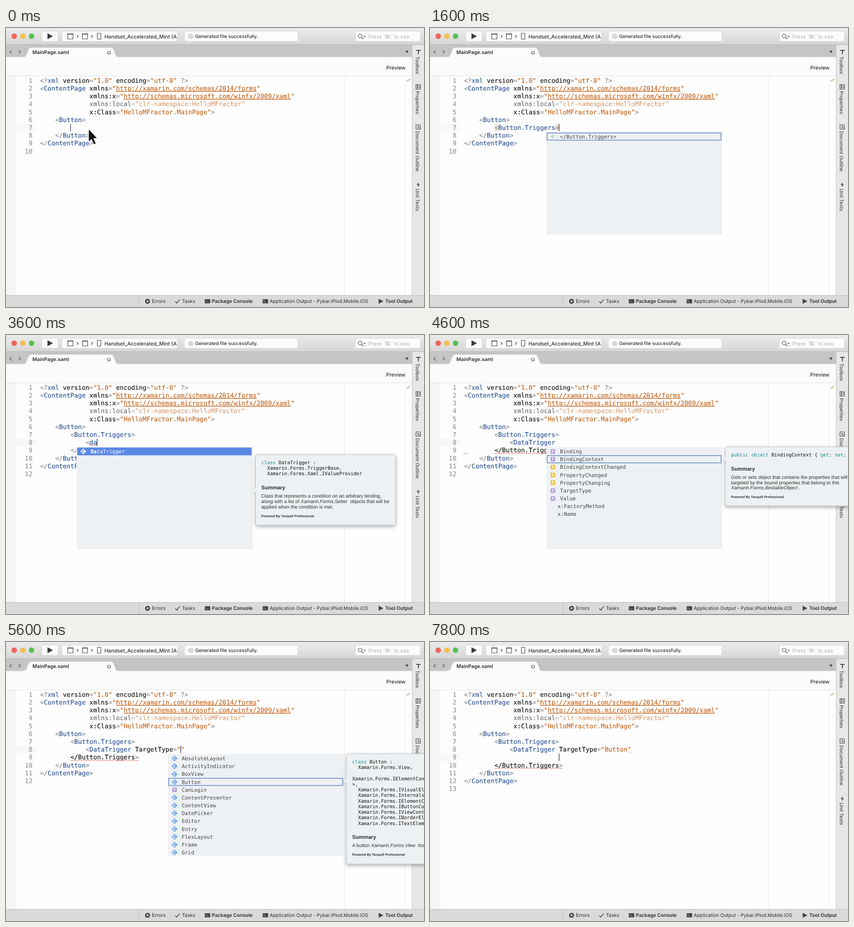
An HTML page that plays this animation: 917 by 611 pixels, repeating every 8000 ms.

```html
<!DOCTYPE html>
<html lang="en">
<head>
<meta charset="utf-8">
<title>XAML completion</title>
<style>
  html, body { margin: 0; width: 100%; height: 100%; overflow: hidden; background: #fefefe; }
  svg { display: block; width: 917px; height: 611px; }
  text { white-space: pre; text-rendering: geometricPrecision; }
  text, tspan { fill: currentColor; }
  .ui { font-family: Inter, sans-serif; color: #2c2c2c; }
  .b { font-weight: 600; }
  .mono { font-family: "DejaVu Sans Mono", monospace; color: #111; }
  .code, .code tspan { stroke: currentColor; stroke-width: .15px; }
  .doc { font-family: "Liberation Sans", Arial, sans-serif; color: #2c2c2c; }
  .p { color: #858585; }
  .tag { color: #2b5293; }
  .str { color: #c1621a; }
  .link { text-decoration: underline 1px; text-underline-offset: 2px; text-decoration-skip-ink: none; }
  .kw { color: #14888f; }
  .num { color: #858585; text-anchor: end; }
  .line { fill: none; stroke: #444; stroke-width: 1.2; }
  .field { fill: #fcfcfc; stroke: #d6d6d6; stroke-width: .6; }
</style>
</head>
<body>
<svg viewBox="0 0 917 611">
  <defs>
    <linearGradient id="bar" x2="0" y2="1"><stop stop-color="#ebebeb"/><stop offset="1" stop-color="#d6d6d6"/></linearGradient>
    <filter id="shadow" x="-10%" y="-10%" width="120%" height="125%">
      <feDropShadow dx="0" dy="3" stdDeviation="4" flood-opacity=".33"/>
    </filter>
    <clipPath id="deviceClip"><rect x="123" y="8" width="251" height="21"/></clipPath>
    <clipPath id="searchClip"><rect x="767" y="8" width="117" height="21"/></clipPath>
  </defs>
  <g id="chrome"></g>
  <g id="editor"></g>
</svg>
<script>
const LOOP = 8000, X0 = 74.7, CHAR = 8.34, ROW = 17.17, CODE = 13.85;
const colX = col => X0 + col * CHAR;
const rowY = row => 115 + row * ROW;
const esc = s => s.replace(/&/g, '&amp;').replace(/</g, '&lt;').replace(/>/g, '&gt;');
const span = (cls, s) => `<tspan class="${cls}">${esc(s)}</tspan>`;
// y is the optical middle of the line
const text = (x, y, size, cls, markup, attrs = '') =>
  `<text x="${x}" y="${y + size * .36}" font-size="${size}" class="${cls}" ${attrs}>${markup}</text>`;
const rect = (x, y, w, h, fill, attrs = '') =>
  `<rect x="${x}" y="${y}" width="${w}" height="${h}" fill="${fill}" ${attrs}/>`;
const path = (d, attrs = 'class="line"') => `<path d="${d}" ${attrs}/>`;
const circle = (x, y, r, attrs) => `<circle cx="${x}" cy="${y}" r="${r}" ${attrs}/>`;

function drawChrome() {
  const field = (x, w) => `<rect x="${x}" y="7.5" width="${w}" height="21.5" rx="3.5" class="field"/>`;
  const side = (y, label) => text(0, 0, 10.4, 'ui', label, `transform="translate(903 ${y}) rotate(90)"`);
  const fill = c => `fill="${c}"`;
  const terminal = x => rect(x, 594, 12, 9, '#444', 'rx="1"') +
    path(`M${x + 2} 596l2 2l-2 2M${x + 5} 600h3`, 'fill="none" stroke="#ddd" stroke-width=".8"');
  return [
    rect(0, 0, 917, 611, '#fefefe'),
    rect(0, 105, 23, 480, '#f5f5f5'),
    rect(0, 63, 891, 42, '#fbfbfb'), rect(0, 104.5, 891, 1, '#e2e2e2'),
    rect(742, 105, 1, 480, '#e9e9e9'), rect(875, 105, 1, 480, '#ededed'),
    rect(0, 0, 917, 36, 'url(#bar)'), rect(0, 36, 917, 1, '#b5b5b5'),
    rect(0, 37, 891, 26.5, '#c5c5c5'),
    path('M39 64C48 63 46 43 56 43H229C240 43 237 63 246 64Z', fill('#fbfbfb')),
    rect(891, 37, 26, 548, '#e7e7e7'), rect(890.5, 37, 1, 548, '#c4c4c4'),
    rect(0, 585, 917, 26, '#dadada'), rect(0, 585, 917, 1, '#bdbdbd'), rect(291, 586, 1, 25, '#bcbcbc'),
    circle(18, 18, 6, fill('#f0655a')), circle(37, 18, 6, fill('#f5bd4c')), circle(56, 18, 6, fill('#56c24d')),
    field(79, 35), field(123, 253), field(392, 248), field(767, 142),
    path('M91 11.5L103 18L91 24.5Z', fill('#3c3c3c')),
    path('M135.5 12.5h11.5v11.5h-11.5zM135.5 14h11.5M167.5 12.5h11.5v11.5h-11.5zM167.5 14h11.5M200.5 11.5h7.5v13h-7.5z'),
    path('M155.5 15.5l3 3l-3 3M187 15.5l3 3l-3 3'),
    text(216, 18.5, 11.2, 'ui', 'Handset_Accelerated_Mint (API 26)', 'font-weight="500" clip-path="url(#deviceClip)"'),
    circle(405, 18.5, 6, fill('#d9d9d9')),
    text(415, 18.5, 10.35, 'ui', 'Generated file successfully.', 'font-weight="500"'),
    circle(777, 17.5, 4, 'class="line"'), path('M780 20.5l4 4M784.5 17.5l2 2l2-2'),
    text(795, 18.5, 11.4, 'ui', 'Press ‘⌘.’ to search', 'style="color:#b2b2b2" clip-path="url(#searchClip)"'),
    path('M12.5 48.5l-4 3.7l4 3.7M28 48.5l4 3.7l-4 3.7'),
    text(58, 53.5, 10.8, 'ui b', 'MainPage.xaml'), circle(226, 54, 3, 'class="line"'),
    path('M876 49.5h7l-3.5 5.5z', fill('#444')),
    text(834, 86.5, 11.3, 'ui', 'Preview', 'style="color:#111"'),
    path('M878.7 114l2.6 2.7l5.2-6', 'fill="none" stroke="#a4bd68" stroke-width="1.5"'),
    path('M900 49h9.5M904.7 49v8.5', 'fill="none" stroke="#444" stroke-width="2"'), side(62, 'Toolbox'),
    path('M899.5 124h9.5v10h-9.5zM902.5 124v10M902.5 127h6M902.5 130.5h6'), side(138, 'Properties'),
    path('M899.5 212h9.5v10h-9.5zM902 215h3v4h3M902 219h6'), side(226, 'Document Outline'),
    path('M905.5 338l-5 5.5h3.5l-1 5l5-6h-3.5z', fill('#444')), side(352, 'Unit Tests'),
    circle(310.5, 598.5, 5.5, fill('#484848')),
    path('M308.3 596.3l4.4 4.4M312.7 596.3l-4.4 4.4', 'stroke="#ddd" stroke-width="1.3"'),
    text(320, 598.5, 10.6, 'ui', 'Errors'),
    path('M371.5 599l3 3.5l6.5-8', 'fill="none" stroke="#444" stroke-width="1.7"'), text(386, 598.5, 10.6, 'ui', 'Tasks'),
    terminal(436), text(451.5, 598.5, 10.7, 'ui b', 'Package Console'),
    terminal(563), text(578.5, 598.5, 10.5, 'ui', 'Application Output - Pybar.iPlod.Mobile.iOS'),
    path('M817.5 593L828 598.5L817.5 604Z', fill('#444')), text(832, 598.5, 10.7, 'ui b', 'Tool Output')
  ].join('');
}

function highlight(line) {
  const token = /(<[\/?]?)([\w.]*)|(\??>)|("[^"]*"?)|(=)|([^<>"=?]+)/g;
  return line.replace(token, (all, open, name, close, string, equals) => {
    if (open) return span('p', open) + span('tag', name);
    if (close || equals) return span('p', all);
    if (!string) return esc(all);
    return string.startsWith('"http')
      ? span('str', '"') + span('str link', string.slice(1, -1)) + span('str', '"')
      : span('str', string);
  });
}

function squiggle(x1, x2, y, color = '#dc5a4e') {
  let d = `M${x1} ${y}`;
  for (let x = x1, up = true; x + 2 <= x2; x += 2, up = !up) d += `l2 ${up ? -2 : 2}`;
  return path(d, `fill="none" stroke="${color}" stroke-width="1"`);
}

function icon(kind, x, y, selected) {
  if (kind === '<') return path(`M${x + 2} ${y - 3}l-5 3l5 3`, 'fill="none" stroke="#8cc665" stroke-width="1.3"');
  if (kind === 'C') {
    const [face, mark] = selected ? ['#fff', '#5987e4'] : ['#6c9ee6', '#fff'];
    return path(`M${x} ${y - 6.5}l6.5 6.5l-6.5 6.5l-6.5-6.5z`, `fill="${face}"`) +
      path(`M${x + 2} ${y - 1.7}a2.6 2.6 0 1 0 0 3.4`, `fill="none" stroke="${mark}" stroke-width="1.4"`);
  }
  if (!'PE'.includes(kind)) return '';
  return rect(x - 5, y - 5, 10, 10, kind === 'P' ? '#b39ddb' : '#f2bd42', 'rx="1"') +
    text(x, y, 8, 'mono', kind, 'text-anchor="middle" style="color:#fff;font-weight:bold"');
}

// Items are written "kind label"; a typed count means a filled selection with a bold prefix.
function drawPopup({ col, items, sel = 0, typed = 0 }, row) {
  const x = colX(col) - 28.2, y = rowY(row) + 9.9, selY = y + 1.4 + sel * ROW;
  let out = rect(x, y, 386, 224, '#eef1f3');
  out += typed ? rect(x + 1.5, selY, 382.5, 17, '#5987e4')
    : rect(x + 2, selY + .5, 381.5, 15.8, '#edf1f6', 'stroke="#6f8fc4" stroke-width="1.7"');
  items.forEach((item, i) => {
    const cy = y + 9.8 + i * ROW, kind = item[0], label = item.slice(2);
    const markup = typed ? `<tspan font-weight="bold">${label.slice(0, typed)}</tspan>${label.slice(typed)}` : esc(label);
    out += icon(kind, x + 14.7, cy, typed) +
      text(x + (kind === '-' ? 25 : 30.3), cy, 11.42, 'mono', markup, `style="color:${typed ? '#fff' : '#444'}"`);
  });
  return out;
}

function drawTip({ x, y, w, h, arrow, code, summary, gap }) {
  const left = x + 12.5;
  let cy = y + 17;
  let out = `<g filter="url(#shadow)">` + rect(x, y, w, h, '#eef1f3', 'rx="4" stroke="#b9bcc0" stroke-width=".8"') +
    path(`M${x + .5} ${arrow - 5}l-5 5l5 5z`, 'fill="#eef1f3"') + '</g>';
  for (const line of code) {
    const indent = line.search(/\S|$/);
    const markup = esc(line.trim()).replace(/\b(class|public|object|get|set)\b;?(?= |$)/g, '<tspan class="kw">$&</tspan>');
    out += text(left + indent * 6.32, cy, 10.5, 'mono', markup);
    cy += 12.25;
  }
  cy += gap;
  out += text(left, cy, 11.5, 'doc', 'Summary', 'font-weight="bold"');
  cy += 18.3;
  for (const line of summary) {
    out += text(left, cy, 10.5, 'doc', line.replace(/_(.+?)_/, '<tspan font-style="italic">$1</tspan>'));
    cy += 11.7;
  }
  return out + text(left, cy + 8.5, 7.25, 'doc', 'Powered By Tavquill Professional', 'font-weight="bold"');
}

const HEAD = [
  '<?xml version="1.0" encoding="utf-8" ?>',
  '<ContentPage xmlns="http://xamarin.com/schemas/2014/forms"',
  '             xmlns:x="http://schemas.microsoft.com/winfx/2009/xaml"',
  '             xmlns:local="clr-namespace:HelloMFractor"',
  '             x:Class="HelloMFractor.MainPage">',
  '    <Button>'
];
const TAIL = ['    </Button>', '</ContentPage>', ''];
const CLOSE = '        </Button.Triggers>';

const dataTip = { x: 547.5, y: 262, w: 307, h: 154, arrow: 340, gap: 18.5,
  code: ['class DataTrigger :', '  Xamarin.Forms.TriggerBase,', '  Xamarin.Forms.Xaml.IValueProvider'],
  summary: ['Class that represents a condition on an arbitrary binding,',
    'along with a list of _Xamarin.Forms.Setter_  objects that will be', 'applied when the condition is met.'] };
const bindingTip = { x: 648, y: 245, w: 310, h: 129, arrow: 271, gap: 18.5,
  code: ['public object BindingContext { get; set; }'],
  summary: ['Gets or sets object that contains the properties that will be',
    'targeted by the bound properties that belong to this', '_Xamarin.Forms.BindableObject_ .'] };
const buttonTip = { x: 747, y: 245, w: 310, h: 241, arrow: 305, gap: 18,
  code: ['class Button :', '  Xamarin.Forms.View,', '', 'Xamarin.Forms.IElementConfiguration<Xamarin.Forms.Button', '>,',
    ...['IVisualElementController', 'Internals.IFontElement', 'IElementController', 'IButtonController',
      'IViewController', 'IBorderElement', 'ITextElement'].map(name => `  Xamarin.Forms.${name},`)],
  summary: ['A button _Xamarin.Forms.View_  that reacts to touch events.'] };

const members = ['P Binding', 'P BindingContext', 'E BindingContextChanged', 'E PropertyChanged', 'E PropertyChanging',
  'P TargetType', 'P Value', '- x:FactoryMethod', '- x:Name'];
const types = ['C AbsoluteLayout', 'C ActivityIndicator', 'C BoxView', 'C Button', 'P CanLogin', 'C ContentPresenter',
  'C ContentView', 'C DatePicker', 'C Editor', 'C Entry', 'C FlexLayout', 'C Frame', 'C Grid'];

const outer = (at, typed, extra) => ({ at, body: ['        ' + typed], row: 6, ...extra });
const inner = (at, typed, extra) =>
  ({ at, body: ['        <Button.Triggers>', '            ' + typed, CLOSE], row: 7, ...extra });
const one = (col, item, typed) => ({ popup: { col, items: [item], typed } });
const trigger = { broken: 8 };

const STEPS = [
  outer(0, '', { mouse: true }),
  outer(400, '<'),
  outer(600, '<bu', one(9, 'C Button', 2)),
  outer(800, '<Button'),
  outer(1000, '<Button.'),
  outer(1200, '<Button.tr', one(16, 'P Triggers', 2)),
  outer(1400, '<Button.Triggers'),
  outer(1600, '<Button.Triggers>', { match: true, popup: { col: 25, items: ['< </Button.Triggers>'] } }),
  outer(2200, '<Button.Triggers></Button.Triggers>', { col: 25 }),
  inner(2400, ''),
  inner(3000, '<'),
  inner(3200, '<d', { ...one(13, 'C DataTrigger', 1), partial: 1 }),
  inner(3400, '<da', { ...one(13, 'C DataTrigger', 2), partial: 2 }),
  inner(3600, '<da', { ...one(13, 'C DataTrigger', 2), partial: 2, tip: dataTip }),
  inner(4000, '<DataTrigger', trigger),
  inner(4200, '<DataTrigger ', { ...trigger, popup: { col: 25, items: members, sel: 1 } }),
  inner(4400, '<DataTrigger ', { ...trigger, popup: { col: 25, items: members, sel: 1 }, tip: bindingTip, noCaret: true, margin: true }),
  inner(4800, '<DataTrigger ta', { ...trigger, ...one(25, 'P TargetType', 2) }),
  inner(5200, '<DataTrigger TargetType=""', { ...trigger, col: 37, popup: { col: 37, items: types, sel: 3 } }),
  inner(5400, '<DataTrigger TargetType=""', { ...trigger, col: 37, popup: { col: 37, items: types, sel: 3 }, tip: buttonTip }),
  inner(6200, '<DataTrigger TargetType="b"', { ...trigger, col: 38, ...one(37, 'C Button', 1), tip: buttonTip }),
  inner(6400, '<DataTrigger TargetType="bu"', { ...trigger, col: 39, ...one(37, 'C Button', 2), tip: buttonTip }),
  inner(6800, '<DataTrigger TargetType="Button"', { ...trigger, col: 43 }),
  inner(7200, '<DataTrigger TargetType="Button"', trigger),
  { at: 7400, row: 8, broken: 9, hint: true,
    body: ['        <Button.Triggers>', '            <DataTrigger TargetType="Button"', ' '.repeat(25), CLOSE] }
];

function drawEditor(step) {
  const lines = [...HEAD, ...step.body, ...TAIL], { row, broken } = step;
  const caretX = colX(step.col ?? lines[row].length), caretY = rowY(row);
  let out = rect(23, caretY - 8.5, 43, 17, '#f8f8f8');
  if (step.match) for (const col of [8, 24]) out += rect(colX(col), caretY - 8, CHAR, 16, '#f0e4d8');
  lines.forEach((line, i) => {
    const indent = line.search(/\S|$/), code = line.trim();
    const markup = i === broken ? esc(code.slice(0, -1)) + span('p', '>') : highlight(code);
    out += text(58, rowY(i), CODE, 'mono num', i + 1) +
      text(colX(indent), rowY(i), CODE, 'mono code', markup, i === 3 ? 'opacity=".62"' : '');
  });
  if (broken) out += squiggle(colX(8), colX(26), rowY(broken) + 8);
  if (step.margin) out += squiggle(X0, X0 + 8, rowY(broken) + 8);
  if (step.partial) out += squiggle(colX(13), colX(13 + step.partial), caretY + 7.5);
  if (step.hint) out += squiggle(colX(43), colX(44), rowY(7) + 8, '#b9c3d2');
  if (!step.noCaret) out += rect(caretX - .6, caretY - 8, 1.3, 16, '#263048');
  if (step.popup) out += drawPopup(step.popup, row);
  if (step.tip) out += drawTip(step.tip);
  if (step.mouse) out += path('M181 220.5V250L187.5 244L192.5 255.5L197.5 253.3L192.7 242H201Z',
    'fill="#111" stroke="#fff" stroke-width="1.4"');
  return out;
}

const editor = document.getElementById('editor');
document.getElementById('chrome').innerHTML = drawChrome();
let shown;
const start = performance.now();
function frame() {
  const t = (performance.now() - start) % LOOP;
  const step = STEPS.findLast(s => s.at <= t);
  if (step !== shown) editor.innerHTML = drawEditor(shown = step);
  requestAnimationFrame(frame);
}
frame();
</script>
</body>
</html>
```
